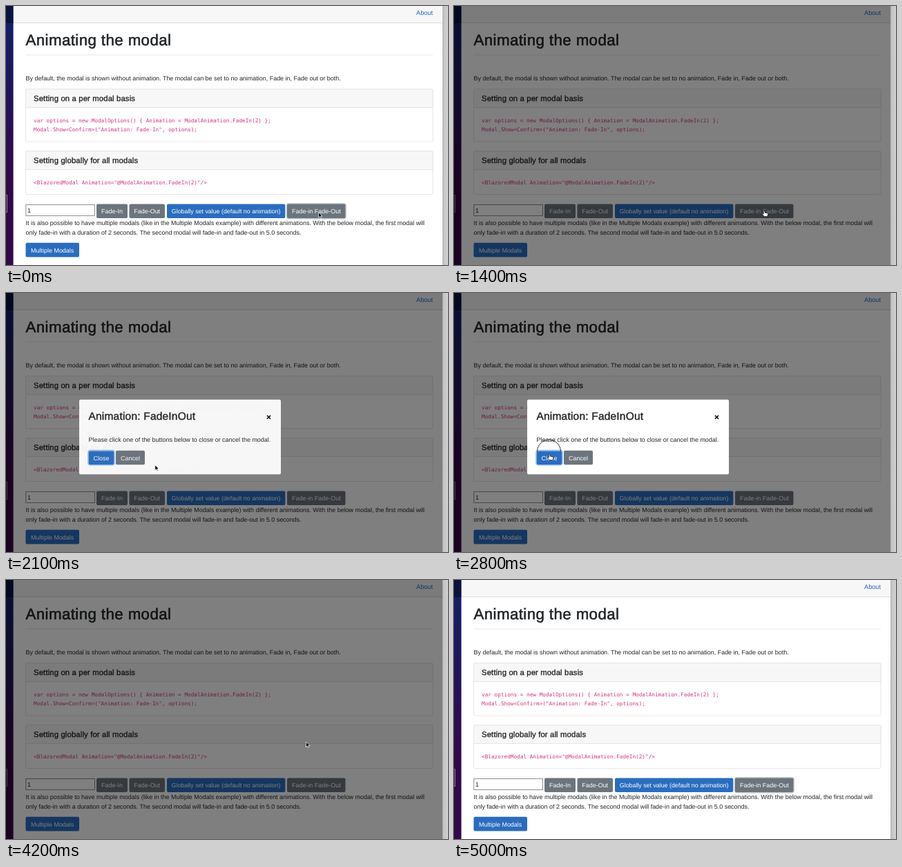
Recreate the animation shown at these times as an HTML page. Size 640x376 px, loop 5370 ms.

```html
<!DOCTYPE html>
<html lang="en">
<head>
<meta charset="utf-8">
<title>Animating the modal</title>
<style>
  html, body { margin: 0; width: 100%; height: 100%; overflow: hidden; background: #fff; }
  svg { display: block; width: 640px; height: 376px; }
  text { font: 8.96px "Liberation Sans", Arial, sans-serif; fill: #212529; text-rendering: geometricPrecision; }
  .h1, .h3, .h5 { stroke: #212529; }
  .h1 { font-size: 22.3px; letter-spacing: .4px; stroke-width: .55px; }
  .h3 { font-size: 15.5px; letter-spacing: .2px; stroke-width: .4px; }
  .h5 { font-size: 11.3px; letter-spacing: .14px; stroke-width: .32px; }
  .code { font: 7.73px "DejaVu Sans Mono", monospace; fill: #d63384; white-space: pre; }
  .btn text { fill: #fff; text-anchor: middle; }
  .blue { fill: #2a6dbf; }
  .gray { fill: #6c757d; }
  .hover .gray { fill: #545b62; }
  .ring { fill: none; stroke-width: 1.6; }
  .card { fill: #fff; stroke: #e6e6e6; }
  .head { fill: #f7f7f7; stroke: #e6e6e6; }
</style>
</head>
<body>
<svg viewBox="0 0 640 376">
  <defs>
    <linearGradient id="side" x2="0" y2="1">
      <stop stop-color="#10206a"/><stop offset=".7" stop-color="#330847"/>
    </linearGradient>
    <linearGradient id="edge">
      <stop stop-color="#b4b4b4"/><stop offset=".3" stop-color="#c6c6c6"/><stop offset="1" stop-color="#d0d0d0"/>
    </linearGradient>
  </defs>

  <rect width="640" height="376" fill="#fff"/>
  <rect x="10.6" width="621.4" height="24.5" fill="#f7f7f7"/>
  <path d="M11 24.5H632" stroke="#dcdcdc"/>
  <rect width="10.6" height="376" fill="url(#side)"/>
  <rect width="10.6" height="25" fill="#000" opacity=".4"/>
  <path d="M0 274.5H1.5V299.5H0" fill="none" stroke="#8d86a0"/>
  <text x="594" y="13" style="fill:#1f68c8;font-size:9.2px">About</text>

  <text class="h1" x="28.5" y="56.7">Animating the modal</text>
  <path d="M29 71H618" stroke="#e8e8e8"/>
  <text x="28.5" y="108">By default, the modal is shown without animation. The modal can be set to no animation, Fade in, Fade out or both.</text>

  <rect class="card" x="28.5" y="120.5" width="589.5" height="76.5" rx="2"/>
  <path class="head" d="M28.5 147.5V122.5Q28.5 120.5 30.5 120.5H616Q618 120.5 618 122.5V147.5Z"/>
  <text class="h5" x="40" y="138">Setting on a per modal basis</text>
  <text class="code" x="40" y="168.5">var options = new ModalOptions() { Animation = ModalAnimation.FadeIn(2) };</text>
  <text class="code" x="40" y="182">Modal.Show&lt;Confirm&gt;("Animation: Fade-In", options);</text>

  <rect class="card" x="28.5" y="210.5" width="589.5" height="63" rx="2"/>
  <path class="head" d="M28.5 237.5V212.5Q28.5 210.5 30.5 210.5H616Q618 210.5 618 212.5V237.5Z"/>
  <text class="h5" x="40" y="228.3">Setting globally for all modals</text>
  <text class="code" x="40" y="259">&lt;BlazoredModal Animation="@ModalAnimation.FadeIn(2)"/&gt;</text>

  <rect x="28.8" y="288.5" width="99.7" height="16" fill="#fff" stroke="#767676" stroke-width=".8"/>
  <text x="31" y="300">1</text>
  <g class="btn"><rect class="gray" x="131" y="287.5" width="45" height="20.5" rx="2"/><text x="153.5" y="301">Fade-In</text></g>
  <g class="btn"><rect class="gray" x="178.5" y="287.5" width="51.5" height="20.5" rx="2"/><text x="204.2" y="301">Fade-Out</text></g>
  <g class="btn"><rect class="blue" x="233" y="287.5" width="171.3" height="20.5" rx="2"/><text x="318.6" y="301" style="font-size:8.84px">Globally set value (default no animation)</text></g>
  <g class="btn" id="opener">
    <rect class="ring" id="openRing" x="406.5" y="286.9" width="85.6" height="21.7" rx="3" stroke="#c4c8cb"/>
    <rect class="gray" x="407" y="287.5" width="84.5" height="20.5" rx="2"/><text x="449.3" y="301">Fade-in Fade-Out</text>
  </g>
  <text x="28.5" y="318">It is also possible to have multiple modals (like in the Multiple Modals example) with different animations. With the below modal, the first modal will</text>
  <text x="28.5" y="331.5">only fade-in with a duration of 2 seconds. The second modal will fade-in and fade-out in 5.0 seconds.</text>
  <g class="btn"><rect class="blue" x="28.5" y="343.8" width="77.5" height="20.7" rx="2"/><text x="67.2" y="357.5">Multiple Modals</text></g>

  <rect id="overlay" width="632" height="376" opacity=".5"/>
  <rect x="632" width="8" height="376" fill="url(#edge)"/>

  <g id="modal">
    <rect x="106" y="154.8" width="292" height="108.5" rx="2" fill="#fff"/>
    <text class="h3" x="119.5" y="184">Animation: FadeInOut</text>
    <path d="M378 177.8L383 182.8M383 177.8L378 182.8" stroke="#000" stroke-width="1.6"/>
    <text x="119.5" y="216.3">Please click one of the buttons below to close or cancel the modal.</text>
    <g class="btn">
      <rect class="ring" x="119" y="228.6" width="38" height="21" rx="3" stroke="#8dbcf0"/>
      <rect class="blue" x="119.8" y="229.4" width="36.4" height="19.5" rx="2"/><text x="138" y="242.5">Close</text>
    </g>
    <g class="btn"><rect class="gray" x="159" y="228.8" width="42" height="20.5" rx="2"/><text x="180" y="242.5">Cancel</text></g>
  </g>

  <path id="ripple" d="M-17-2A17 17 0 0 1 17-2" fill="none" stroke="#333"/>
  <g id="cursor" stroke="#fff" stroke-width=".7" stroke-linejoin="round">
    <path id="arrow" d="M0 0V7.6L1.8 6L3 8.6L4.3 8L3.1 5.5H5.5Z" fill="#000"/>
    <path id="hand" d="M-.9 .4Q0-.6 .8 .4L1.2 3L4.8 3.8Q5.8 4.2 5.6 5.4L4.8 8.6H.2L-2.6 5.2Q-2.6 4-1.4 4.4L-.6 5Z" fill="#fff" stroke="#111"/>
  </g>
</svg>
<script>
const LOOP = 5370;
const $ = id => document.getElementById(id);
const show = (id, on) => $(id).style.display = on ? "" : "none";
const clamp = v => Math.max(0, Math.min(1, v));
const easeOut = u => u * (2 - u);
const smooth = u => u * u * (3 - 2 * u);

// Cursor legs: start, end, target x, target y, easing
const legs = [
  [900, 1000, 449, 297, smooth],
  [1700, 2500, 138, 234, easeOut],
  [3250, 3400, 165, 240, smooth],
  [3400, 3900, 433, 294, smooth],
  [3900, 4200, 434.5, 235, smooth],
  [4250, 4500, 432, 262, smooth],
  [4600, 5000, -12, 48, smooth],
];

function cursorAt(t) {
  let x = 452.5, y = 299.5;
  for (const [start, end, tx, ty, ease] of legs) {
    const u = ease(clamp((t - start) / (end - start)));
    x += (tx - x) * u;
    y += (ty - y) * u;
  }
  return [x, y];
}

// CSS "ease" timing: cubic-bezier(.25, .1, .25, 1)
function cssEase(x) {
  let lo = 0, hi = 1;
  for (let i = 0; i < 20; i++) {
    const s = (lo + hi) / 2, r = 1 - s;
    if (.75 * r * r * s + .75 * r * s * s + s * s * s < x) lo = s; else hi = s;
  }
  const r = 1 - lo;
  return .3 * r * r * lo + 3 * r * lo * lo + lo ** 3;
}
const fade = (t, start) => cssEase(clamp((t - start) / 1000));

function draw(now) {
  const t = Math.floor(now % LOOP / 100) * 100;
  const open = t >= 1400 && t < 4300;
  show("overlay", open);
  show("openRing", !open);
  $("modal").setAttribute("opacity", fade(t, 1400) - fade(t, 3100));
  $("opener").classList.toggle("hover", t >= 1000 && t < 1400);

  const [x, y] = cursorAt(t);
  const hand = (t >= 1000 && t <= 1700) || (t >= 2400 && t <= 3400);
  $("cursor").setAttribute("transform", `translate(${x} ${y})`);
  show("cursor", t < 5000);
  show("hand", hand);
  show("arrow", !hand);

  show("ripple", t === 1000 || t === 2800);
  $("ripple").setAttribute("transform", `translate(${x - .5} ${y - 2})`);
  requestAnimationFrame(() => draw(performance.now()));
}
draw(0);
</script>
</body>
</html>
```
